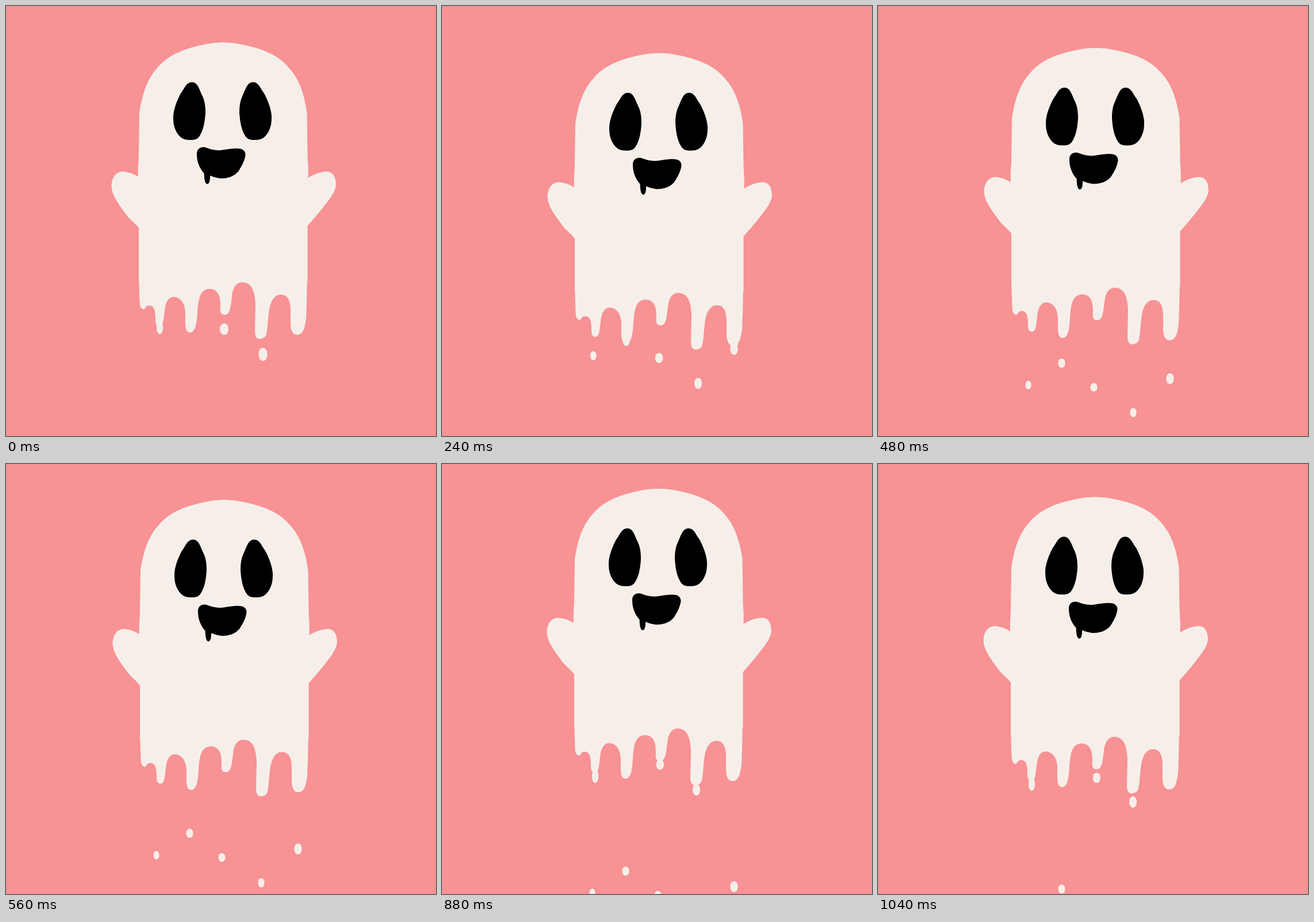
An HTML page for the animation above (1120 ms loop, 748 px wide and 748 px high).

```html
<!DOCTYPE html>
<html lang="en">
<head>
<meta charset="utf-8">
<title>Dripping ghost</title>
<style>
  html, body { margin: 0; width: 100%; height: 100%; overflow: hidden; background: #f79295; }
  svg { display: block; width: 100%; height: 100%; }
</style>
</head>
<body>
<svg viewBox="0 0 748 748">
  <g id="drops" fill="#f6efe9"></g>
  <g id="ghost">
    <g fill="#f6efe9">
      <path id="half" d="M380 63.5C360 63.5 355 65 340 68C304 76 280 87 262 109C244 129 236 158 232 186
        L231 255C231 270 229 280 230 297L231 386V479H380Z"/>
      <use href="#half" transform="translate(755.5) scale(-1 1)"/>
      <path d="M240 302L230 297C222 292 214 289 205 288C194 287 186 295 184 307C183 312 183 319 188 331
        C193 341 202 353 210 364C218 374 224 377 231 386H240Z"/>
      <path d="M515 304L525.5 299C535 293 546 288 558 288C570 288 574 300 574 311C573 322 566 332 555 346
        C545 359 532 374 524 383H515Z"/>
      <path d="M231 470L232.5 515C233 522 234 527 240 528C243 525 243 521 249 521C258 521 260 530 260 545
        C260 550 260 557 267 557S274 545 276 530C277 520 280 507 291 506C304 506 312 518 312 535
        C312 550 310 568 320 568C333 568 332 540 334 520C336 508 338 493 354 492V470Z"/>
      <path d="M353 470V492C371 492 373 508 373 523C372 531 373 538 381 537C391 537 391 518 393 505
        C394 496 397 481 411 480.5C429 481 433 498 434 520L433 563C433 572 434 578 440 579
        C446 579 452 577 453 570C455 562 455 552 457 535C459 515 466 502 478 502S495 512 495 530V551
        C495 563 498 572 506 572C513 572 518 567 520 555C523 545 522 535 523 518L524 470Z"/>
    </g>
    <path id="eye" d="M323 132.5C333 132 336 144 341 155C346 165 347 175 347 186C346 200 344 214 338 224
      C333 234 325 233 319 233C307 233 301 227 296 218C291 208 291 200 291 191C292 178 298 163 304 152
      C311 143 313 133 323 132.5Z"/>
    <use href="#eye" transform="translate(753) scale(-1 1)"/>
    <path d="M332 259C331 249 338 244 347 246C355 249 362 251 373 251C384 250 393 247 404 248
      C414 248 418 255 416 262C414 272 409 280 404 288C396 297 385 300 373 300C366 299 360 297 355 295
      C355 300 355 309 350 310C346 308 345 303 344.5 291C337 283 332 271 332 259Z"/>
    <g id="beads" fill="#f6efe9"></g>
  </g>
</svg>
<script>
const STEP = 80, STEPS = 14;

// Keys: [step, value]
const bob = [[0, 0], [2, 13.5], [3, 18.5], [4, 21.5], [5, 20], [7, -1], [11, -20.5], [13, -6]];
const sway = [[0, 0], [5, 0], [7, 2], [11, -1], [13, 0]];
const fall = [[0, 0], [2, 35.5], [5, 80], [7, 122.5], [9, 157], [14, 235]];

// Free drops are wide by "swell" and off by "drift" when they let go
const drops = [
  { first: 1, x: 261.5, y: 558, w: 10, h: 15, swell: 1, drift: 3.5 },
  { first: 3, x: 319.5, y: 520, w: 12, h: 16, swell: 0, drift: 1 },
  { first: 0, x: 375.5, y: 562, w: 12, h: 15, swell: 3, drift: 4 },
  { first: 0, x: 444, y: 606, w: 11, h: 16, swell: 4, drift: 3 },
  { first: 1, x: 508, y: 547, w: 13, h: 19, swell: 0, drift: 0 }
];

// Beads hang from the hem and slide down between two steps
const beads = [
  { first: 9, last: 11, x: 267.5, from: 556, to: 563.5, w: 11, h: 24 },
  { first: 12, last: 14, x: 267.5, from: 566, to: 559, w: 11, h: 24 },
  { first: 3, last: 5, x: 320.5, from: 557, to: 562, w: 14, h: 32 },
  { first: 9, last: 13, x: 380.3, from: 534.5, to: 552, w: 13, h: 18 },
  { first: 8, last: 13, x: 443.5, from: 577, to: 594, w: 13, h: 20 },
  { first: 3, last: 5, x: 508, from: 569, to: 569, w: 14, h: 17 }
];

function sample(keys, step) {
  const next = Math.max(1, keys.findIndex(key => key[0] >= step));
  const [t0, v0] = keys[next - 1], [t1, v1] = keys[next];
  return v0 + (v1 - v0) * (step - t0) / (t1 - t0);
}

const ghost = document.getElementById("ghost");

function addBlob(parentId, item) {
  const node = document.createElementNS("http://www.w3.org/2000/svg", "rect");
  item.node = document.getElementById(parentId).appendChild(node);
}

function placeBlob(node, x, y, w, h) {
  const box = { x: x - w / 2, y: y - h / 2, width: w, height: h, rx: w / 2, ry: h * 0.45 };
  for (const name in box) node.setAttribute(name, box[name]);
}

function show(node, visible) {
  node.style.display = visible ? "" : "none";
  return visible;
}

function placeDrop({ node, first, x, y, w, h, swell, drift }, step) {
  if (!show(node, step >= first)) return;
  const fresh = Math.max(0, 1 - step / 6);
  const grow = swell * fresh;
  placeBlob(node, x + drift * fresh, y + sample(fall, step), w + grow, h + 1.7 * grow);
}

function placeBead({ node, first, last, x, from, to, w, h }, step) {
  const now = step + STEPS <= last ? step + STEPS : step;
  if (!show(node, now >= first && now <= last)) return;
  placeBlob(node, x, from + (to - from) * (now - first) / (last - first), w, h);
}

function draw(ms) {
  const step = Math.floor(Math.max(0, ms) / STEP) % STEPS;
  ghost.setAttribute("transform", `translate(${sample(sway, step)} ${sample(bob, step)})`);
  drops.forEach(drop => placeDrop(drop, step));
  beads.forEach(bead => placeBead(bead, step));
}

drops.forEach(drop => addBlob("drops", drop));
beads.forEach(bead => addBlob("beads", bead));

const start = performance.now();
function tick() {
  draw(performance.now() - start);
  requestAnimationFrame(tick);
}
tick();
</script>
</body>
</html>
```
